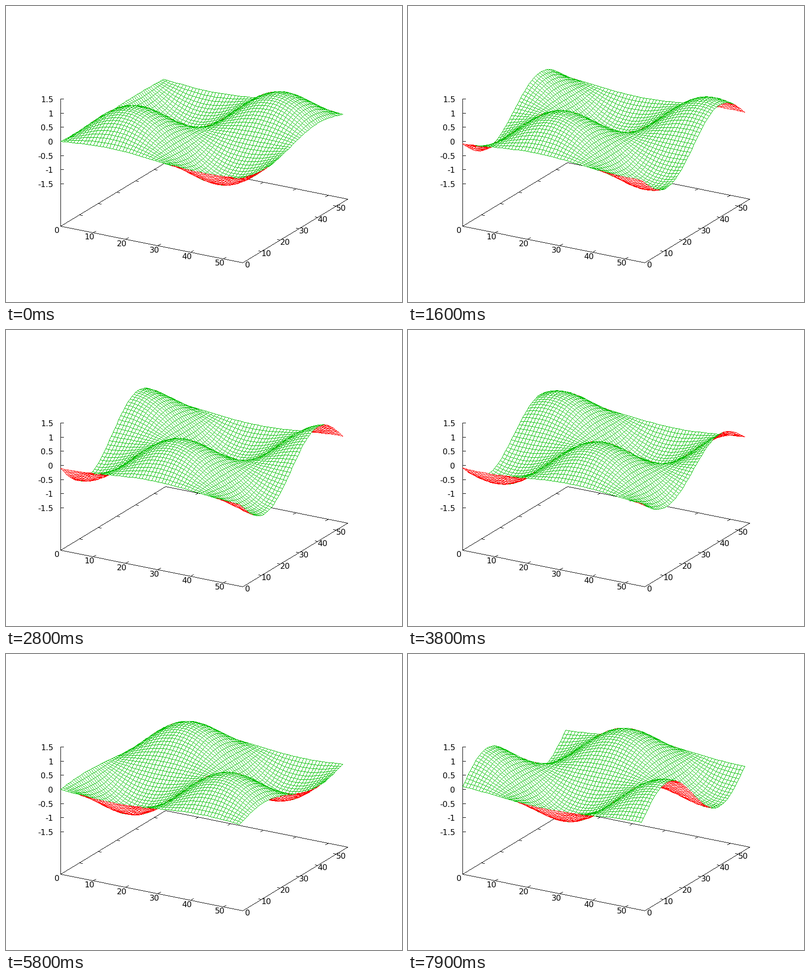
A matplotlib script for the animation above (8000 ms loop, 800 by 600 pixels).

```python
import numpy as np
import matplotlib.pyplot as plt
from matplotlib.animation import FuncAnimation

W, H, DPI = 800, 600, 100
FRAMES, INTERVAL = 80, 100

SPAN = 56                 # axis range of x and y
N = 56                    # grid points per side
WAVELENGTH = 57
SPEED = 0.5               # grid units per frame
Z_MAX, Z_BASE = 1.5, -3

ORIGIN = np.array([110.0, 446.01])
X_AXIS = np.array([368.0, 74.25])
Y_AXIS = np.array([212.0, -128.6])
Z_UNIT = 57.16

WHITE, BLACK, GREEN, RED = range(4)
PALETTE = np.array([[255, 255, 255], [0, 0, 0], [0, 192, 0], [255, 0, 0]], np.uint8)


def project(x, y, z):
    px = ORIGIN[0] + (x * X_AXIS[0] + y * Y_AXIS[0]) / SPAN
    py = ORIGIN[1] + (x * X_AXIS[1] + y * Y_AXIS[1]) / SPAN - (z - Z_BASE) * Z_UNIT
    return np.stack([px, py], axis=-1)


def to_pixels(points):
    points = np.asarray(points)
    return np.stack([np.rint(points[..., 0]),
                     np.floor(points[..., 1])], axis=-1).astype(np.int32)


def trace(start, end):
    """Canvas indices along crisp one-pixel lines; short lines repeat their end."""
    d = (end - start)[..., None, :]
    n = np.maximum(np.abs(d).max(axis=-1, keepdims=True), 1)
    step = np.minimum(np.arange(n.max() + 1, dtype=np.int32)[:, None], n)
    p = start[..., None, :] + (2 * d * step + n) // (2 * n)
    return p[..., 1] * W + p[..., 0]


def cross(a, b):
    return a[..., 0] * b[..., 1] - a[..., 1] * b[..., 0]


def unit(v):
    return v / np.hypot(*v)


fig = plt.figure(figsize=(W / DPI, H / DPI), dpi=DPI, facecolor="white")
ax = fig.add_axes([0, 0, 1, 1])
ax.axis("off")


def label(x, y, text, ha="center"):
    ax.text(x, y + 6, text, ha=ha, va="baseline", color="black",
            family="DejaVu Sans", size=16 * 72 / DPI)


def draw_axes():
    corners = [project(x, y, Z_BASE)
               for x, y in ((0, 0), (SPAN, 0), (SPAN, SPAN), (0, SPAN))]
    lines = [(corners[k], corners[(k + 1) % 4]) for k in range(4)]
    lines.append((corners[0], project(0, 0, Z_MAX)))

    tick_x, tick_y = 6 * unit(Y_AXIS), 6 * unit(X_AXIS)
    for v in range(0, SPAN, 10):
        front = project(v, 0, Z_BASE)
        right = project(SPAN, v, Z_BASE)
        label(front[0] - 7.5, front[1] + 7.5, str(v))
        label(right[0] + 9.5, right[1] + 3, str(v))
        if v:
            back = project(v, SPAN, Z_BASE)
            left = project(0, v, Z_BASE)
            lines += [(front, front + tick_x), (back, back - tick_x),
                      (left, left + tick_y), (right, right - tick_y)]

    for z in np.arange(-1.5, 1.6, 0.5):
        p = project(0, 0, z)
        lines.append((p, p + [6, 0]))
        label(95, p[1], f"{z:g}", ha="right")

    canvas = np.full(W * H, WHITE, np.uint8)
    ends = to_pixels(lines)
    canvas[trace(ends[:, 0], ends[:, 1])] = BLACK
    return canvas


gx, gy = np.meshgrid(np.arange(N), np.arange(N), indexing="ij")
K = 2 * np.pi / WAVELENGTH

# Cells from the far side to the near side; the view is turned by 30 degrees.
ci, cj = (a.ravel() for a in np.meshgrid(np.arange(N - 1), np.arange(N - 1),
                                         indexing="ij"))
order = np.argsort(0.5 * ci - np.sqrt(0.75) * cj, kind="stable")
ci, cj = ci[order], cj[order]
cell_i = np.stack([ci, ci + 1, ci + 1, ci], axis=1)
cell_j = np.stack([cj, cj, cj + 1, cj + 1], axis=1)

# Pixel window that is large enough for any cell.
wx, wy = (a.ravel() for a in np.meshgrid(np.arange(13, dtype=np.int32),
                                         np.arange(19, dtype=np.int32)))


def paint_surface(canvas, n):
    """Paint each cell as a white face, then its outline, from back to front."""
    z = np.sin(K * (gx - SPEED * n - 0.25)) * np.sin(K * (gy + 1))
    quads = project(gx, gy, z)[cell_i, cell_j]
    from_above = cross(quads[:, 2] - quads[:, 0], quads[:, 3] - quads[:, 1]) < 0

    start = to_pixels(quads)
    end = np.roll(start, -1, axis=1)
    outline = trace(start, end).reshape(len(quads), -1)

    low = start.min(axis=1)
    face = (low[:, 1:] + wy) * W + low[:, :1] + wx
    turn = np.where(from_above, -1, 1).astype(np.int32)[:, None]
    inside = np.ones(face.shape, bool)
    for k in range(4):
        d = (end[:, k] - start[:, k]) * turn
        p = start[:, k] - low
        inside &= d[:, :1] * wy - d[:, 1:] * wx >= cross(d, p)[:, None]

    cells = np.concatenate([face, outline], axis=1)
    keep = np.concatenate([inside, np.ones(outline.shape, bool)], axis=1)
    ink = np.full(cells.shape, WHITE, np.uint8)
    ink[:, face.shape[1]:] = np.where(from_above, GREEN, RED)[:, None]
    canvas[cells[keep]] = ink[keep]


axes_canvas = draw_axes()
image = ax.imshow(PALETTE[axes_canvas].reshape(H, W, 3), interpolation="nearest",
                  aspect="auto", extent=(-0.5, W - 0.5, H - 0.5, -0.5))


def update(n):
    canvas = axes_canvas.copy()
    paint_surface(canvas, n)
    image.set_data(PALETTE[canvas].reshape(H, W, 3))
    return (image,)


anim = FuncAnimation(fig, update, frames=FRAMES, interval=INTERVAL,
                     repeat=True, blit=False)
plt.show()
```
